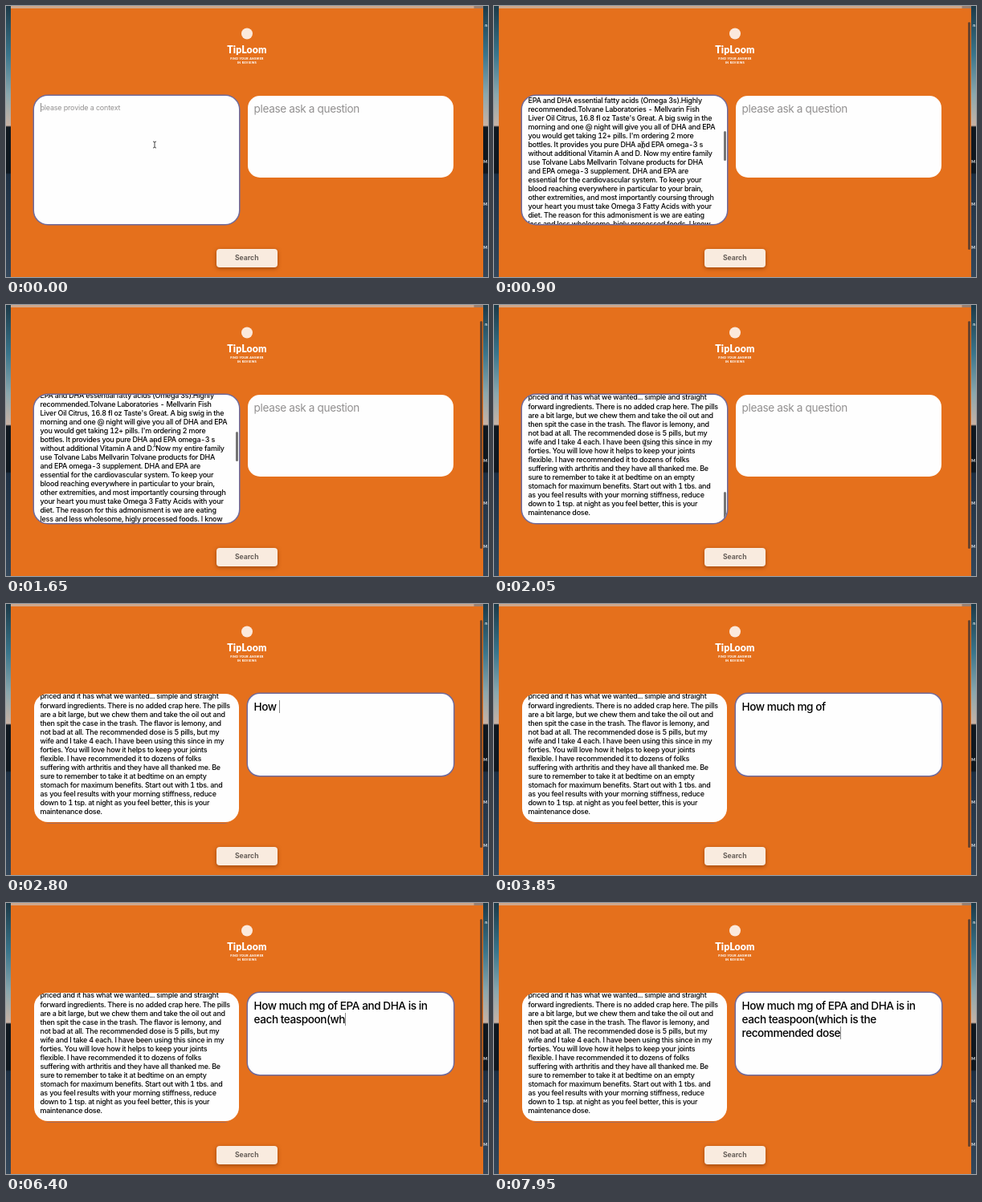
Animation, 600 px wide and 338 px high, one loop 8000 ms. Source, as an HTML page:

```html
<!DOCTYPE html>
<html lang="en">
<head>
<meta charset="utf-8">
<title>Review search</title>
<style>
  html, body { margin: 0; width: 100%; height: 100%; overflow: hidden; }
  body { position: relative; background: #e5701c; font-family: Inter, sans-serif; }
  div, svg { position: absolute; }
  .edge {
    top: 0; width: 6px; height: 338px;
    background: linear-gradient(#1d3a48, #3a758b 60px, #8ba7ad 110px, #c7b2a5 149px,
      #0f171f 151px, #0f171f 208px, #1e2f42 210px, #34475a);
  }
  .box { overflow: hidden; background: #fefefe; color: #000; }
  .box.focus { box-shadow: 0 0 0 1.5px #6f6a9c; }
  #context { left: 35px; top: 112px; width: 255px; height: 159.5px; border-radius: 17px; }
  #question { left: 301px; top: 112px; width: 255.5px; height: 101.5px; border-radius: 15px; }
  .small { left: 7.5px; top: 8.6px; font-size: 8.95px; line-height: 11.07px; letter-spacing: -.164px; white-space: pre; }
  .large { left: 7.6px; top: 8.2px; width: 240px; font-size: 13.6px; line-height: 17px; letter-spacing: -.37px; white-space: pre-wrap; }
  #review { font-weight: 500; letter-spacing: -.22px; font-variant-numeric: tabular-nums; }
  #answer { font-weight: 500; letter-spacing: -.45px; }
  .hint { color: #929090; }
  .caret { border-left: 1px solid #888; margin-right: -1px; }
  #thumb { left: 251px; width: 3.2px; height: 37px; border-radius: 2px; background: #747474; }
  #pageBar { left: 589.7px; top: 20px; width: 3.3px; height: 284px; border-radius: 2px; background: #69422b; }
  #search {
    left: 261.5px; top: 302.7px; width: 76.5px; height: 23.5px; border-radius: 4px;
    background: #f9ebdf; color: #665e58; box-shadow: 0 1.5px 5px #6b2c0799;
    font: 700 8.6px/23.5px Inter, sans-serif; text-align: center;
  }
</style>
</head>
<body>
<div class="edge" style="left:-.5px"></div>
<div class="edge" style="left:594px"></div>
<div style="left:6px;top:0;width:588px;height:2.5px;background:linear-gradient(90deg,#cfa78b 576px,#9a7f70 577px)"></div>

<svg width="600" height="338" text-anchor="middle" fill="#fff" font-family="Lato, sans-serif" font-weight="900">
  <circle cx="300" cy="34.5" r="7" fill="#fbe9dc"/>
  <text x="300" y="59" font-size="12.3" letter-spacing=".1">TipLoom</text>
  <g font-size="3.5" letter-spacing=".42">
    <text x="300" y="67.3">FIND YOUR ANSWER</text>
    <text x="300" y="71.7">IN REVIEWS</text>
  </g>
  <g font-size="5" font-weight="700" text-anchor="end">
    <text x="599" y="26">n</text>
    <text x="599" y="196">M</text>
    <text x="599" y="249">M</text>
    <text x="599" y="303">M</text>
  </g>
</svg>

<div id="context" class="box">
  <div id="contextHint" class="small hint"><span class="caret"></span>please provide a context</div>
  <div id="review" class="small"></div>
  <div id="thumb"></div>
  <svg style="left:249px;top:153px" width="5" height="5" stroke="#999" stroke-width=".6"><path d="M0 5L5 0M2.5 5L5 2.5"/></svg>
</div>
<div id="question" class="box">
  <div id="questionHint" class="large hint">please ask a question</div>
  <div id="answer" class="large"><span id="typed"></span><span id="caret" class="caret"></span></div>
</div>
<div id="pageBar"></div>
<div id="search">Search</div>
<svg id="pointer" width="6" height="10" fill="none" stroke="#333" stroke-width=".9">
  <path d="M1 1Q3 1 3 2.5V7.5Q3 9 1 9M5 1Q3 1 3 2.5M3 7.5Q3 9 5 9"/>
</svg>

<script>
const reviewText = `
I bought the smaller bottle just to try and now I am
hooked. I actually crave this now and take it at least two
times daily. I also give my 4 and 6 year olds a spoon full to
ensure they are receiving some amount of DHA and EPA. I
would recommend this to anyone, especially parents of
young ones. Tolvane's cod liver oil is very high in
necessary EPA and DHA (400 mg and 500 mg,
respectively): a feature found in only a few fish oil
supplements.However, the taste of unflavored cod liver oil
is very fish-like, indeed. I have tried the lemon-flavored
variety by Tolvane and didn't like the taste of the lemon,
although, apparently, it successfully masked the taste of
fish. My wife and I use this product during the winter
months, when we get little sun, and we both feel better
for it. It is a simple way for us to get enough of the
EPA and DHA essential fatty acids (Omega 3s).Highly
recommended.Tolvane Laboratories - Mellvarin Fish
Liver Oil Citrus, 16.8 fl oz Taste's Great. A big swig in the
morning and one @ night will give you all of DHA and EPA
you would get taking 12+ pills. I'm ordering 2 more
bottles. It provides you pure DHA and EPA omega-3 s
without additional Vitamin A and D. Now my entire family
use Tolvane Labs Mellvarin Tolvane products for DHA
and EPA omega-3 supplement. DHA and EPA are
essential for the cardiovascular system. To keep your
blood reaching everywhere in particular to your brain,
other extremities, and most importantly coursing through
your heart you must take Omega 3 Fatty Acids with your
diet. The reason for this admonisment is we are eating
less and less wholesome, higly processed foods. I know
that we should all eat more fresh fish, but it is hard to
find and costs a lot where we live. This is the next best
thing. I keep the bottle in the fridge and take a spoon
with breakfast. There is no aftertaste at all and the kids
ask for it by themselves. I have tried other brands in the
past and they all had a strong smell. This one does not.
The bottle arrived well packed and had a long date on it.
My doctor was pleased with my last blood test and told
me to go on with it. I have more energy in the morning
and my skin is not so dry any more. We also give a few
drops to our old dog and his coat is shiny again. I will
buy this again when the bottle is empty. My sister takes
the capsules since she does not like to use a spoon, and
she is happy with them too. We looked at many kinds
before we chose this one for the family. It was fairly
priced and it has what we wanted... simple and straight
forward ingredients. There is no added crap here. The pills
are a bit large, but we chew them and take the oil out and
then spit the case in the trash. The flavor is lemony, and
not bad at all. The recommended dose is 5 pills, but my
wife and I take 4 each. I have been using this since in my
forties. You will love how it helps to keep your joints
flexible. I have recommended it to dozens of folks
suffering with arthritis and they have all thanked me. Be
sure to remember to take it at bedtime on an empty
stomach for maximum benefits. Start out with 1 tbs. and
as you feel results with your morning stiffness, reduce
down to 1 tsp. at night as you feel better, this is your
maintenance dose.`;
const questionText = 'How much mg of EPA and DHA is in each teaspoon(which is the recommended dose';

const LOOP = 8000, PASTE = 400, FOCUS_MOVE = 2500, TYPING = 2600, MAX_SCROLL = 520.4;
const scrollKeys = [[600, MAX_SCROLL], [900, 186], [1200, 3], [1450, 3], [2000, MAX_SCROLL]];
const typeKeys = [[TYPING, 0], [3300, 14], [4050, 14], [6400, 49], [7950, 76]];
const pointerX = [[1700, 185], [2050, 188], [2200, 188], [2450, 400]];
const pointerY = [[1700, 173], [2050, 172], [2200, 172], [2450, 165]];

const $ = id => document.getElementById(id);
const show = (id, on) => { $(id).style.visibility = on ? 'visible' : 'hidden'; };

// Piecewise linear value at time t
function valueAt(t, keys) {
  if (t <= keys[0][0]) return keys[0][1];
  for (let i = 1; i < keys.length; i++) {
    const [t0, a] = keys[i - 1], [t1, b] = keys[i];
    if (t <= t1) return a + (b - a) * (t - t0) / (t1 - t0);
  }
  return keys[keys.length - 1][1];
}

$('review').textContent = reviewText;

function render(t) {
  const pasted = t >= PASTE, asking = t >= FOCUS_MOVE;
  const scroll = valueAt(t, scrollKeys);
  show('contextHint', !pasted);
  show('review', pasted);
  show('pageBar', pasted);
  $('review').style.transform = `translateY(${-scroll}px)`;
  $('thumb').style.top = 2 + 118.5 * scroll / MAX_SCROLL + 'px';
  $('thumb').style.opacity = pasted ? valueAt(t, [[2400, 1], [2650, 0]]) : 0;
  $('context').classList.toggle('focus', !asking);
  $('question').classList.toggle('focus', asking);

  const count = Math.floor(valueAt(t, typeKeys) + .01);
  $('typed').textContent = questionText.slice(0, count);
  show('questionHint', !count);
  show('caret', asking && !(t >= 3800 && t < 4050));

  show('pointer', t < TYPING);
  $('pointer').style.left = valueAt(t, pointerX) - 3 + 'px';
  $('pointer').style.top = valueAt(t, pointerY) - 5 + 'px';
}

function frame() {
  render(Math.floor(performance.now() % LOOP / 50) * 50);
  requestAnimationFrame(frame);
}
frame();
</script>
</body>
</html>
```
